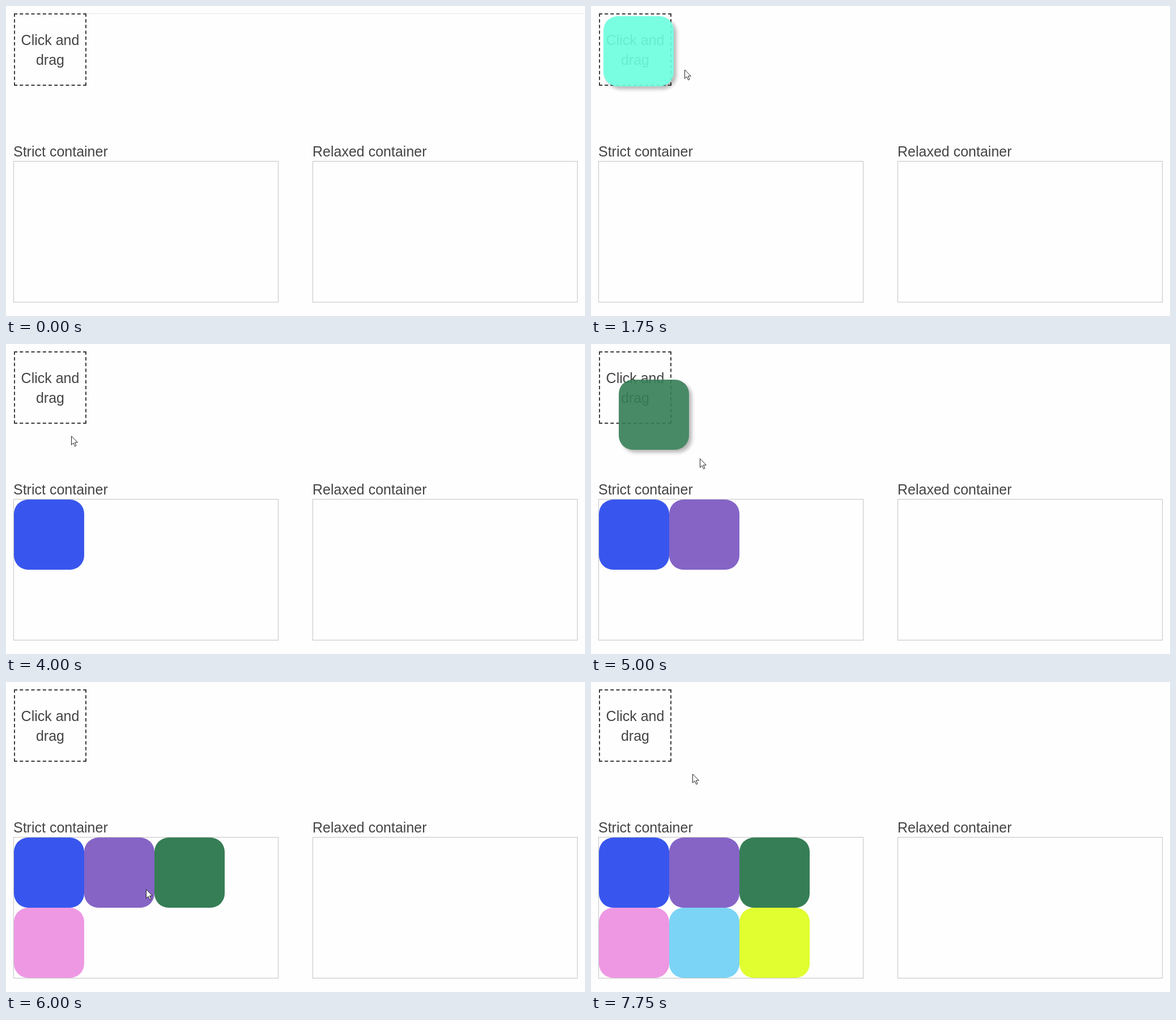
An HTML page for the animation above (8 s loop, 1022 by 548 pixels).

```html
<!DOCTYPE html>
<html lang="en">
<head>
<meta charset="utf-8">
<title>Drag and drop containers</title>
<style>
html, body { margin: 0; width: 100%; height: 100%; overflow: hidden; background: #fefefe; }
body { position: relative; font: 25px/35px "Liberation Sans", Arial, sans-serif; color: #444; }
body > * { position: absolute; box-sizing: border-box; }
#line { left: 142px; top: 13px; width: 880px; height: 1px; background: #e6e6e6; }
#home { left: 14px; top: 13px; width: 128px; height: 128px; border: 2px dashed #3c3c3c; padding-top: 28px; text-align: center; }
.label { top: 240px; white-space: nowrap; }
.container { top: 274px; width: 468px; height: 250px; border: 1px solid #c3c3c3; }
.strict { left: 13px; }
.relaxed { left: 541px; }
.tile { left: 0; top: 0; width: 124px; height: 124px; border-radius: 25px; }
.dragged { opacity: .9; box-shadow: 5px 5px 6px rgba(0, 0, 0, .3); }
#cursor { left: 0; top: 0; }
</style>
</head>
<body>
<div id="line"></div>
<div id="home">Click and drag</div>
<div class="label strict">Strict container</div>
<div class="label relaxed">Relaxed container</div>
<div class="container strict"></div>
<div class="container relaxed"></div>
<svg id="cursor" width="14" height="22" viewBox="0 0 14 22">
  <path d="M.5 .8V16.3L4 12.9L6.6 18.8L9 17.7L6.4 12H11.4Z" fill="#fff" stroke="#222"/>
</svg>
<script>
const STEP = 250, STEPS = 32;

// Waypoints are [step, x, y]; a tile lands in its slot, or vanishes without one.
const pointer = [
  [2, 600, 300], [4, 180, 130], [5, 110, 95], [6, 108, 92], [7, 165, 112], [9, 649, 133],
  [11, 115, 97], [12, 336, 126], [13, 342, 130], [14, 95, 95], [15, 140, 365], [16, 115, 162],
  [17, 125, 140], [18, 220, 385], [19, 90, 100], [20, 192, 202], [21, 290, 375],
  [22, 100, 110], [24, 247, 366], [25, 110, 110], [26, 160, 180], [27, 250, 375],
  [28, 110, 115], [29, 170, 190], [30, 300, 430], [31, 179, 162]
];
const drags = [
  { color: '#6cffdf', end: 10, path: [[7, 22, 18], [9, 545, 54]] },
  { color: '#49c917', end: 14, path: [[11, 16, 18], [12, 232, 47], [13, 238, 50]] },
  { color: '#3856ee', end: 16, slot: 0, path: [[14, 16, 20], [15, 35, 285]] },
  { color: '#8564c6', end: 19, slot: 1, path: [[17, 22, 34], [18, 118, 300]] },
  { color: '#367e56', end: 22, slot: 2, path: [[20, 49, 63], [21, 188, 292]] },
  { color: '#ee98e3', end: 24, slot: 3, path: [[23, 60, 180]] },
  { color: '#7bd4f6', end: 28, slot: 4, path: [[26, 40, 60], [27, 148, 298]] },
  { color: '#e0fe30', end: 31, slot: 5, path: [[29, 45, 70], [30, 198, 350]] }
];

const cursor = document.getElementById('cursor');
const line = document.getElementById('line');
for (const drag of drags) {
  drag.tile = document.createElement('div');
  drag.tile.style.background = drag.color;
  document.body.insertBefore(drag.tile, cursor);
}

function along(path, step) {
  const next = path.findIndex(p => p[0] >= step);
  if (next < 0) return path[path.length - 1].slice(1);
  const b = path[next], a = path[next - 1] || b;
  const k = a === b ? 0 : (step - a[0]) / (b[0] - a[0]);
  return [a[1] + (b[1] - a[1]) * k, a[2] + (b[2] - a[2]) * k];
}

function place(el, visible, [x, y]) {
  el.style.display = visible ? 'block' : 'none';
  el.style.transform = `translate(${Math.round(x)}px, ${Math.round(y)}px)`;
}

function draw(now) {
  const step = Math.floor(now / STEP) % STEPS;
  line.style.display = step ? 'none' : 'block';
  place(cursor, step >= pointer[0][0], along(pointer, step));
  for (const { tile, path, end, slot } of drags) {
    const dropped = step >= end;
    tile.className = dropped ? 'tile' : 'tile dragged';
    const spot = dropped ? [14 + slot % 3 * 124, 275 + Math.floor(slot / 3) * 124] : along(path, step);
    place(tile, step >= path[0][0] && (!dropped || slot >= 0), spot);
  }
}

const start = performance.now();
function tick() {
  draw(performance.now() - start);
  requestAnimationFrame(tick);
}
tick();
</script>
</body>
</html>
```
